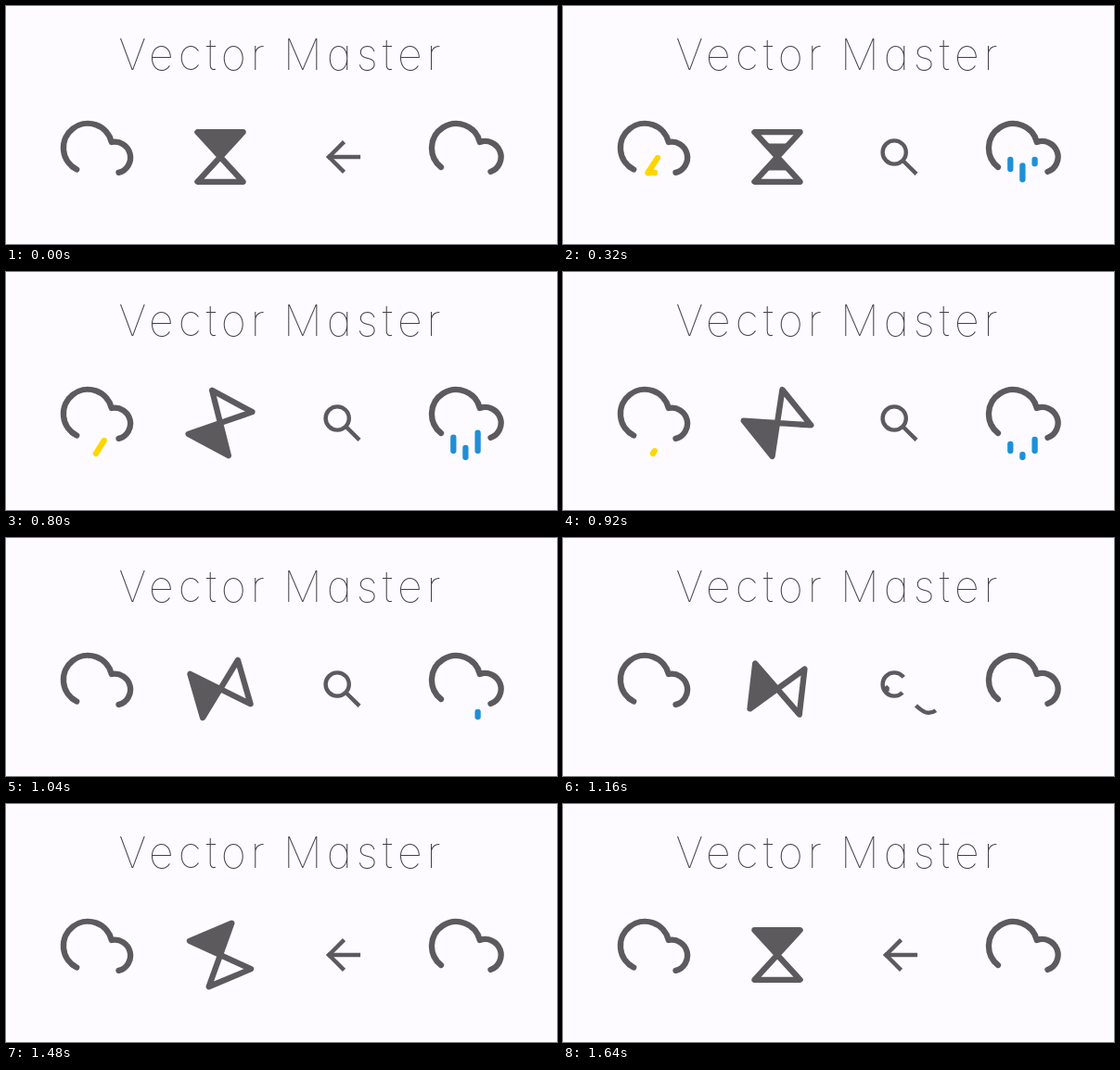
These frames come from a looping animation (594 px wide and 257 px high, 1.72 s). An HTML page:

```html
<!DOCTYPE html>
<html lang="en">
<head>
<meta charset="utf-8">
<title>Vector Master</title>
<style>
  html, body { margin: 0; width: 100%; height: 100%; overflow: hidden; background: #fdfbff; }
  svg { display: block; width: 594px; height: 257px; }
  text {
    font: 100 46.5px Inter, Lato, sans-serif;
    font-optical-sizing: none;
    font-feature-settings: "cv11";
    letter-spacing: 5.1px;
    fill: #444246;
  }
  .line { fill: none; stroke: #5c5a5d; }
  .round { stroke-width: 6.3; stroke-linecap: round; stroke-linejoin: round; }
  .thin { stroke-width: 4.4; }
  .bolt { stroke: #ffd600; }
  .rain { stroke: #1f8fd6; }
</style>
</head>
<body>
<svg viewBox="0 0 594 257">
  <defs>
    <clipPath id="level"><rect id="sand" x="200" y="134" width="62" height="29"/></clipPath>
  </defs>

  <text y="68.5"><tspan x="121.5">Vector </tspan><tspan x="299">Master</tspan></text>

  <path class="line round" d="M76.2 176.5A26.3 26.3 0 1 1 113.8 147A16.9 16.9 0 0 1 121.5 179.9"/>
  <path id="bolt" class="line round bolt" pathLength="1" d="M102 164L91.5 180H107L97 196"/>

  <g id="glass">
    <path d="M206.4 136.2H255.6L206.4 189.8H255.6Z" fill="#5c5a5d" clip-path="url(#level)"/>
    <path class="line round" d="M206.4 136.2H255.6L206.4 189.8H255.6Z"/>
  </g>

  <g class="line thin">
    <path id="lens" pathLength="1" d="M366 167A12.6 12.6 0 1 1 366 149A12.6 12.6 0 0 1 366 167"/>
    <path id="stem" pathLength="1" d="M366 166.5L381 181.3C386 186 390 188.7 394 188.7C402 188.7 406.7 183 406.7 175.5C406.7 168 402 163 395 163H347"/>
    <path id="armUp" pathLength="1" d="M346.6 164.5L364.5 146.6"/>
    <path id="armDown" pathLength="1" d="M346.6 161.5L364.5 179.4"/>
  </g>

  <path class="line round" d="M469 174A26.3 26.3 0 1 1 510.8 147A16.9 16.9 0 0 1 522.5 178.9"/>
  <path id="dropL" class="line round rain" pathLength="1" d="M482.3 166V193"/>
  <path id="dropM" class="line round rain" pathLength="1" d="M495.4 172.5V200"/>
  <path id="dropR" class="line round rain" pathLength="1" d="M508.6 166V193"/>
</svg>
<script>
const LOOP = 1720, STEP = 40, LAST = 1640;
const $ = id => document.getElementById(id);
const ramp = (t, from, to) => Math.min(1, Math.max(0, (t - from) / (to - from)));

// Show only the part of a path between fractions a and b.
function trim(id, a, b) {
  const s = $(id).style;
  s.visibility = b - a > 0.001 ? "visible" : "hidden";
  s.strokeDasharray = `${b - a} 2`;
  s.strokeDashoffset = -a;
}

// Path id, draw-in start and end, wipe-out start and end (ms).
const strokes = [
  ["bolt", 80, 560, 465, 950],
  ["dropM", 75, 530, 510, 968],
  ["dropL", 152, 605, 590, 1035],
  ["dropR", 250, 705, 670, 1125]
];

function draw(t) {
  for (const [id, in0, in1, out0, out1] of strokes)
    trim(id, ramp(t, out0, out1), ramp(t, in0, in1));

  $("sand").setAttribute("y", 134 + 29 * ramp(t, 0, 640));
  $("glass").setAttribute("transform", `rotate(${180 * ramp(t, 650, 1600)} 231 163)`);

  // 1 is the arrow, 0 the magnifier.
  const arrow = 1 - ramp(t, 0, 310) + ramp(t, 1082, 1422);
  trim("lens", 0, 1 - arrow);
  trim("stem", 0.717 * arrow, 0.17 + 0.83 * arrow);
  trim("armUp", 0, arrow);
  trim("armDown", 0, arrow);
}

const start = performance.now();
function tick() {
  const t = (performance.now() - start) % LOOP;
  draw(Math.min(LAST, Math.floor(t / STEP) * STEP));
  requestAnimationFrame(tick);
}
tick();
</script>
</body>
</html>
```
